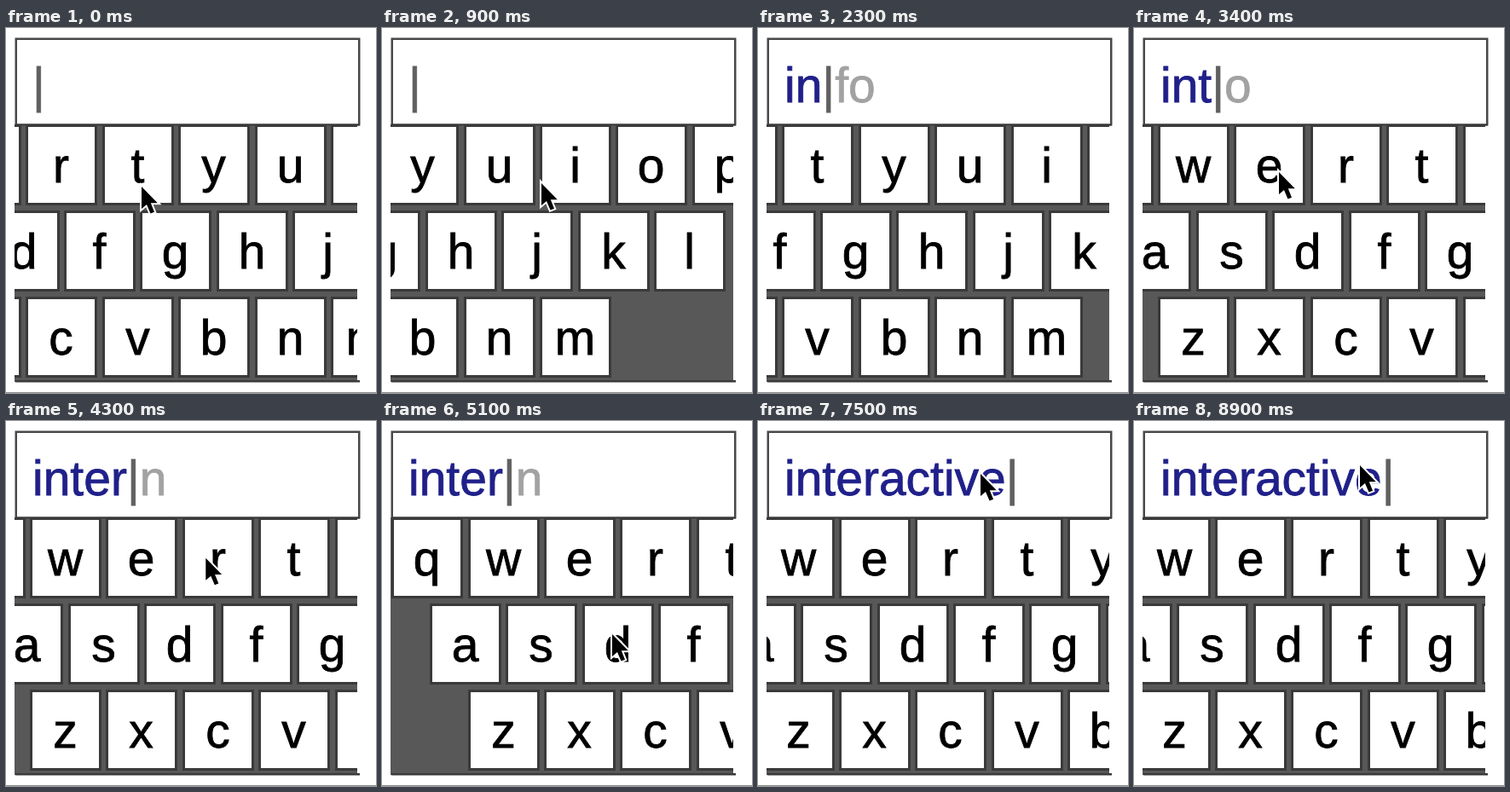
These frames come from a looping animation (434x428 px, 9 s). An HTML page with a canvas:

```html
<!DOCTYPE html>
<html lang="en">
<head>
<meta charset="utf-8">
<title>Sliding keyboard</title>
<style>
  html, body { margin: 0; width: 100%; height: 100%; overflow: hidden; background: #fff; }
  canvas { display: block; width: 434px; height: 428px; }
</style>
</head>
<body>
<canvas id="stage" width="434" height="428"></canvas>
<script>
const ctx = document.getElementById('stage').getContext('2d');
const LOOP = 9000, STEP = 100;
const PITCH = 89.4, KEY_W = 78, KEY_H = 89, EDGE = 3;
const TEXT_X = 31, TEXT_Y = 87;
const DARK = '#3a3a3a';
const rows = ['qwertyuiop', 'asdfghjkl', 'zxcvbnm'];

const setFont = () => {
  ctx.font = '57px "Liberation Sans", Arial, sans-serif';
  ctx.fontKerning = 'none';
};
setFont();

const clamp01 = v => Math.min(1, Math.max(0, v));
const rowY = r => 116 + Math.round(r * 100.8);
const keyX = (r, i, offset) => Math.floor(14.6 + r * PITCH / 2 + i * PITCH + offset);

// Each drag shifts the keyboard steadily between two times.
const drags = [
  { from: 500, to: 900, shift: -196 },
  { from: 2050, to: 2900, shift: 379.5 },
  { from: 4700, to: 5000, shift: 72.5 },
  { from: 6700, to: 7000, shift: -95 }
];
const scrollAt = t => drags.reduce(
  (sum, d) => sum + d.shift * clamp01((t - d.from) / (d.to - d.from)), -256);

// Single letters are pressed on a key, longer parts are tapped in the field.
const entries = [
  { t: 1400, add: 'i', rest: 'n' },
  { t: 1900, add: 'n', rest: 'fo' },
  { t: 3100, add: 't', rest: 'o' },
  { t: 3600, add: 'e', rest: 'r' },
  { t: 4100, add: 'r', rest: 'n' },
  { t: 5700, add: 'a', rest: 'ct' },
  { t: 6300, add: 'ct', rest: 'ive' },
  { t: 7500, add: 'ive', rest: '' }
];
const typedAt = t => entries.filter(e => e.t <= t).map(e => e.add).join('');

function spotFor({ t, add }) {
  if (add.length > 1) return [TEXT_X + ctx.measureText(typedAt(t)).width - 10, 62];
  const r = rows.findIndex(row => row.includes(add));
  return [keyX(r, rows[r].indexOf(add), scrollAt(t)) + KEY_W / 2 + 11, rowY(r) + 53];
}

// Pointer stops: the pointer rests on every spot shortly before it clicks.
const stops = [
  [0, 159, 186], [200, 394, 159], [500, 394, 159], [900, 187, 182],
  [2400, 132, 170], [4700, 200, 150], [5100, 270, 250],
  [6700, 229, 206], [7000, 134, 185], [8300, 103, 62], [8900, 265, 52],
  ...entries.flatMap(e => [200, 100].map(lead => [e.t - lead, ...spotFor(e)]))
].sort((a, b) => a[0] - b[0]);

function pointerAt(t) {
  const i = Math.max(1, stops.findIndex(s => s[0] >= t));
  const [t0, x0, y0] = stops[i - 1], [t1, x1, y1] = stops[i];
  const k = (t - t0) / (t1 - t0);
  return [x0 + (x1 - x0) * k, y0 + (y1 - y0) * k];
}

function box(color, x, y, w, h) {
  ctx.fillStyle = color;
  ctx.fillRect(x, y, w, h);
}

function write(text, color, x, y) {
  ctx.fillStyle = ctx.strokeStyle = color;
  ctx.lineWidth = 0.8;
  ctx.fillText(text, x, y);
  ctx.strokeText(text, x, y);
}

function drawField(t) {
  box('#484848', 10.5, 11.5, 405, 103);
  box('#fff', 13, 14, 400, 98.5);
  const last = entries.filter(e => e.t <= t).pop();
  const parts = [[typedAt(t), '#20208a'], ['|', '#606060'], [last ? last.rest : '', '#a2a2a2']];
  ctx.textAlign = 'left';
  let x = TEXT_X;
  for (const [text, color] of parts) {
    write(text, color, x, TEXT_Y);
    x += ctx.measureText(text).width;
  }
}

function drawKeys(offset) {
  ctx.save();
  ctx.beginPath();
  ctx.rect(10, 113, 402, 302);
  ctx.clip();
  box('#585858', 10, 113, 402, 302);
  ctx.textAlign = 'center';
  rows.forEach((row, r) => [...row].forEach((key, i) => {
    const x = keyX(r, i, offset), y = rowY(r);
    box(DARK, x - EDGE, y - EDGE, KEY_W + 2 * EDGE, KEY_H + 2 * EDGE);
    box('#fff', x, y, KEY_W, KEY_H);
    write(key, '#000', x + KEY_W / 2 - 0.5, y + 65);
  }));
  ctx.restore();
  box(DARK, 11, 112.5, 404, 2);
  box(DARK, 11, 413, 404, 2.5);
}

const arrow = new Path2D('M0 0V26L6 21L10.5 31.5L15 29.7L10.8 19.2H18.8Z');

function drawPointer(x, y) {
  ctx.save();
  ctx.translate(x, y);
  ctx.lineWidth = 4;
  ctx.strokeStyle = '#fff';
  ctx.stroke(arrow);
  ctx.fillStyle = '#000';
  ctx.fill(arrow);
  ctx.restore();
}

function draw(t) {
  setFont();
  box('#fff', 0, 0, 434, 428);
  box('#8a8a8a', 0, 427, 434, 1);
  drawField(t);
  drawKeys(scrollAt(t));
  const away = t > 2050 && t < 2400;
  if (!away) drawPointer(...pointerAt(t));
}

const start = performance.now();
function tick() {
  const t = (performance.now() - start) % LOOP;
  draw(Math.floor(t / STEP) * STEP);
  requestAnimationFrame(tick);
}
tick();
</script>
</body>
</html>
```
